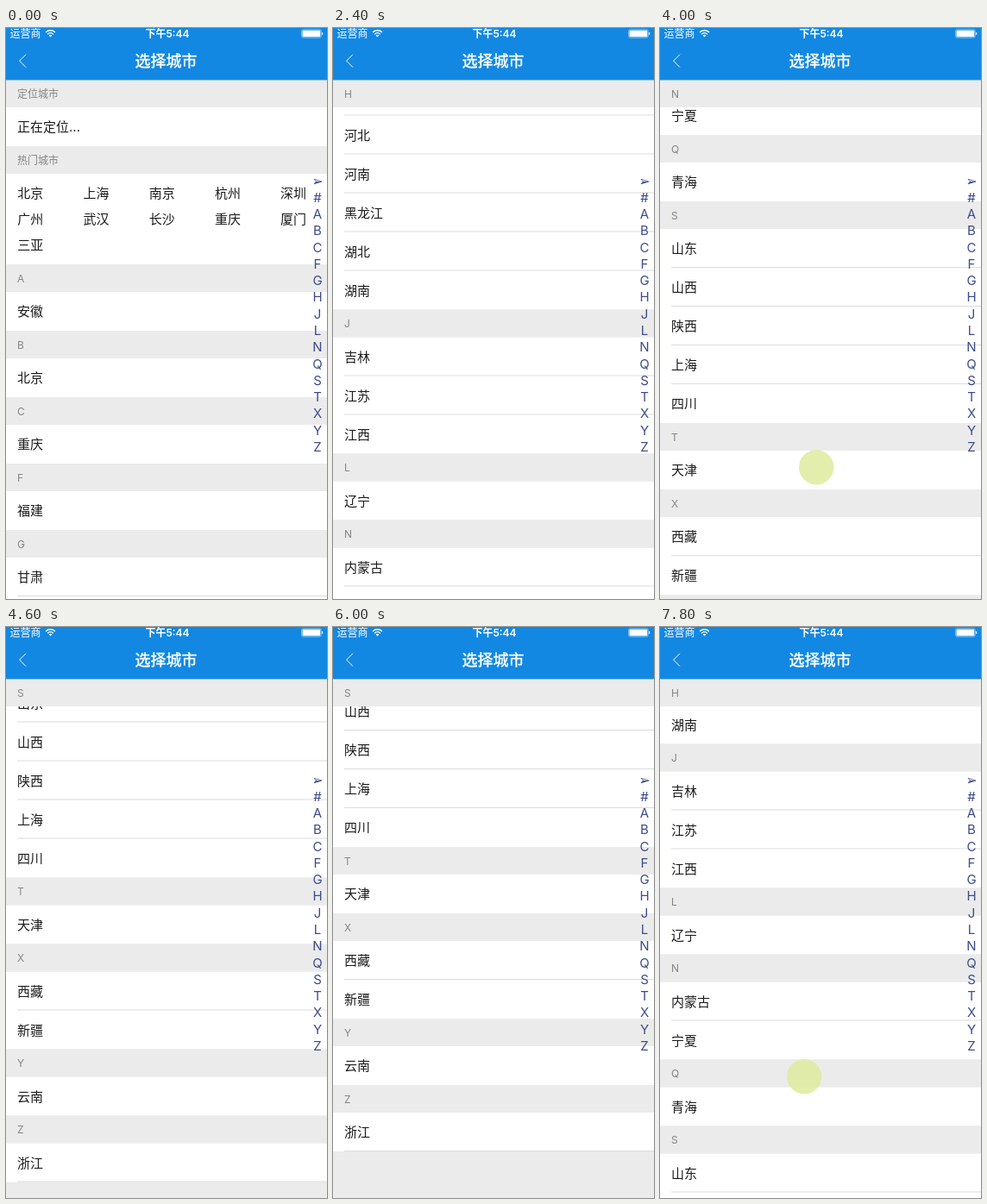
Animation, 372 px wide and 662 px high, one loop 8 s. Source, as an HTML page with a canvas:

```html
<!DOCTYPE html>
<html lang="zh-CN">
<head>
<meta charset="utf-8">
<title>选择城市</title>
<style>
html, body { margin: 0; width: 100%; height: 100%; overflow: hidden; background: #fff; }
canvas { display: block; width: 372px; height: 662px; }
</style>
</head>
<body>
<canvas id="stage"></canvas>
<script>
const W = 372, H = 662, LOOP = 8000, STEP = 200;
const NAV = 60, HEAD = 32, ROW = 45, GRID = 105;
const FONT = '"Inter", "Noto Sans CJK SC", "Noto Sans CJK", sans-serif';
const BLUE = '#1288e3', GRAY = '#ebebeb';

const canvas = document.getElementById('stage');
const ctx = canvas.getContext('2d');
const dpr = window.devicePixelRatio || 1;
canvas.width = W * dpr;
canvas.height = H * dpr;

const hotCities = '北京 上海 南京 杭州 深圳 广州 武汉 长沙 重庆 厦门 三亚'.split(' ');
const provinces = {
  A: '安徽', B: '北京', C: '重庆', F: '福建',
  G: '甘肃 广东 广西 贵州',
  H: '海南 河北 河南 黑龙江 湖北 湖南',
  J: '吉林 江苏 江西', L: '辽宁', N: '内蒙古 宁夏', Q: '青海',
  S: '山东 山西 陕西 上海 四川',
  T: '天津', X: '西藏 新疆', Y: '云南', Z: '浙江'
};
const letters = Object.keys(provinces);

const sections = [
  { title: '定位城市', rows: ['正在定位...'] },
  { title: '热门城市', rows: [], grid: true },
  ...letters.map(k => ({ title: k, rows: provinces[k].split(' ') }))
];
let total = NAV;
for (const s of sections) {
  s.top = total;
  total += HEAD + (s.grid ? GRID : s.rows.length * ROW);
  s.end = total;
}

const linear = u => u;
const fling = u => (1 - Math.exp(-3.2 * u)) / (1 - Math.exp(-3.2));

// time, scroll offset, easing towards that offset
const scrollKeys = [
  [0, 0], [1350, 0, linear], [1600, 248, linear], [3200, 875, fling],
  [3450, 1115, linear], [4000, 1338, fling],
  [4200, 1495, linear], [4400, 1560, linear], [4900, 1487.5, fling],
  [5400, 1487.5, linear], [5800, 1594, fling], [6600, 1502, fling],
  [6900, 1224, linear], [7800, 960.5, fling], [LOOP, 960.5, linear]
];

// start, end, then the finger's path from x, y to x, y
const touches = [
  [1350, 1600, 182, 392, 194, 144],
  [3200, 3450, 170, 481, 186, 241],
  [4000, 4400, 181, 509, 200, 210],
  [5400, 5800, 199, 434, 208, 200],
  [6600, 6900, 185, 242, 176, 520],
  [7800, 7999, 167, 521, 167, 521]
];

const mix = (a, b, u) => a + (b - a) * u;

// offsets settle on half pixels
function scrollAt(t) {
  const i = scrollKeys.findIndex(k => k[0] > t);
  const [t0, y0] = scrollKeys[i - 1], [t1, y1, ease] = scrollKeys[i];
  return Math.round(2 * mix(y0, y1, ease((t - t0) / (t1 - t0)))) / 2;
}

function rect(x, y, w, h, color) {
  ctx.fillStyle = color;
  ctx.fillRect(x, y, w, h);
}

function text(str, x, midY, size, color, align = 'left', weight = 400) {
  ctx.font = `${weight} ${size}px ${FONT}`;
  ctx.textAlign = align;
  ctx.fillStyle = color;
  ctx.fillText(str, x, midY + size * 0.37);
}

function drawRows(s, offset) {
  const top = s.top + HEAD - offset;
  rect(0, top, W, s.end - offset - top, '#fff');
  if (s.grid) {
    hotCities.forEach((c, i) =>
      text(c, 13.3 + (i % 5) * 76.2, top + 22.2 + Math.floor(i / 5) * 30, 15, '#1c1c1c'));
    return;
  }
  s.rows.forEach((name, i) => {
    const y = top + i * ROW;
    text(name, 13, y + ROW / 2, 15, '#1c1c1c');
    const last = i === s.rows.length - 1;
    if (!last || s.title === 'Z') rect(13, y + ROW - 1, W - 13, 1, '#dcdcde');
  });
}

function drawHeader(s, offset) {
  const y = Math.max(s.top - offset, Math.min(NAV, s.end - offset - HEAD));
  rect(0, y, W, HEAD, GRAY);
  text(s.title, 13, y + HEAD / 2 + 0.5, 12, '#858585');
}

function drawList(offset) {
  rect(0, NAV, W, H - NAV, GRAY);
  const shown = sections.filter(s => s.end - offset > NAV && s.top - offset < H);
  shown.forEach(s => drawRows(s, offset));
  shown.forEach(s => drawHeader(s, offset));
}

function drawIndex() {
  const color = '#3d4b8b';
  ctx.strokeStyle = color;
  ctx.lineWidth = 0.8;
  ctx.beginPath();
  ctx.moveTo(357, 175.3);
  ctx.lineTo(366, 178);
  ctx.lineTo(357, 180.8);
  ctx.lineTo(359.5, 178);
  ctx.closePath();
  ctx.stroke();
  ctx.beginPath();
  ctx.moveTo(359.5, 178);
  ctx.lineTo(366, 178);
  ctx.lineTo(357, 180.8);
  ctx.fillStyle = color;
  ctx.fill();
  ['#', ...letters].forEach((c, i) =>
    text(c, 361, 196.3 + i * 19.27, 15, color, 'center'));
}

function drawWifi() {
  const x = 51.5, y = 10.5;
  ctx.strokeStyle = '#fff';
  ctx.lineWidth = 1.5;
  for (const r of [4.7, 7.7]) {
    ctx.beginPath();
    ctx.arc(x, y, r, -Math.PI * 0.75, -Math.PI * 0.25);
    ctx.stroke();
  }
  ctx.beginPath();
  ctx.moveTo(x, y);
  ctx.arc(x, y, 2.6, -Math.PI * 0.75, -Math.PI * 0.25);
  ctx.fillStyle = '#fff';
  ctx.fill();
}

function drawBattery() {
  ctx.strokeStyle = 'rgba(255,255,255,.55)';
  ctx.lineWidth = 0.8;
  ctx.beginPath();
  ctx.roundRect(342.5, 1.8, 22.8, 9.4, 2);
  ctx.stroke();
  ctx.fillStyle = '#fff';
  ctx.beginPath();
  ctx.roundRect(343.5, 2.8, 20.8, 7.4, 1);
  ctx.fill();
  rect(366, 5, 1.2, 3, 'rgba(255,255,255,.8)');
}

function drawNav() {
  rect(0, 0, W, NAV + 0.4, BLUE);
  text('运营商', 4.5, 6.5, 12, '#fff');
  drawWifi();
  text('下午5:44', 187, 6.5, 12, '#fff', 'center', 600);
  drawBattery();
  ctx.strokeStyle = '#fff';
  ctx.lineWidth = 1;
  ctx.beginPath();
  ctx.moveTo(23, 30.7);
  ctx.lineTo(15.6, 38.1);
  ctx.lineTo(23, 45.5);
  ctx.stroke();
  text('选择城市', 185.5, 38.3, 18, '#fff', 'center', 500);
  // a hairline outline gives the title its medium weight
  ctx.lineWidth = 0.4;
  ctx.strokeText('选择城市', 185.5, 38.3 + 18 * 0.37);
}

function drawTouch(t) {
  const touch = touches.find(([a, b]) => t >= a && t <= b);
  if (!touch) return;
  const [a, b, x0, y0, x1, y1] = touch;
  const u = (t - a) / (b - a);
  ctx.fillStyle = 'rgba(222,236,158,.85)';
  ctx.beginPath();
  ctx.arc(mix(x0, x1, u) + 0.2, mix(y0, y1, u) + 0.3, 20.2, 0, Math.PI * 2);
  ctx.fill();
}

function draw(t) {
  ctx.setTransform(dpr, 0, 0, dpr, 0, 0);
  drawList(scrollAt(t));
  drawIndex();
  drawNav();
  drawTouch(t);
}

const start = performance.now();
function tick() {
  const t = (performance.now() - start) % LOOP;
  draw(Math.floor(t / STEP) * STEP);
  requestAnimationFrame(tick);
}
tick();
</script>
</body>
</html>
```
